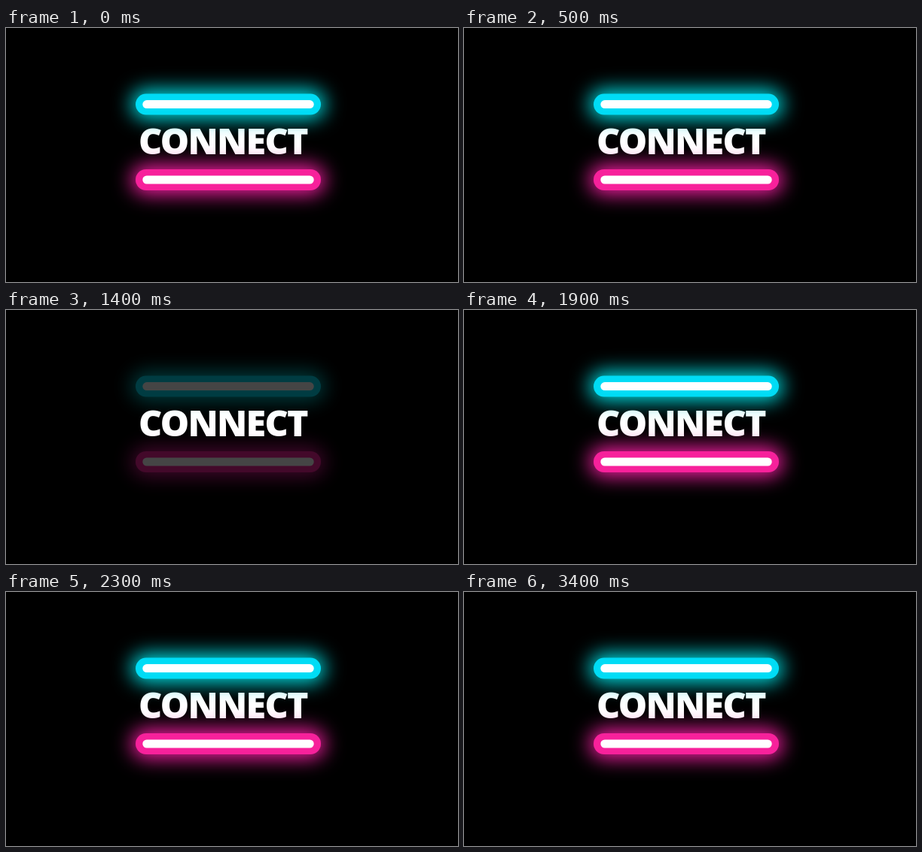
Recreate the animation shown at these times as an HTML page. Size 600 by 338 pixels, loop 3.5 s.

```html
<!DOCTYPE html>
<html lang="en">
<head>
<meta charset="utf-8">
<title>Connect</title>
<style>
  html, body { margin: 0; width: 100%; height: 100%; overflow: hidden; background: #000; }
  svg { display: block; width: 600px; height: 338px; }
  text { font: 800 48.3px "Open Sans", sans-serif; letter-spacing: -1.7px; fill: #fff; }
</style>
</head>
<body>
<svg viewBox="0 0 600 338">
  <defs>
    <filter id="glow" filterUnits="userSpaceOnUse" x="100" y="20" width="400" height="280" color-interpolation-filters="sRGB">
      <feGaussianBlur stdDeviation="13"/>
    </filter>
  </defs>
  <rect width="600" height="338" fill="#000"/>
  <text x="176" y="168.3">CONNECT</text>
  <g id="tubes"></g>
</svg>
<script>
  const LOOP = 3500;
  const DIM = 0.27;
  const SPREAD = 5.5;
  // spans of low light, in ms
  const dips = [[300, 500], [800, 1500], [2100, 2300]];
  const tubes = document.getElementById('tubes');

  function bar(x, y, w, h, fill, extra = '') {
    return `<rect x="${x}" y="${y}" width="${w}" height="${h}" rx="${h / 2}" fill="${fill}" ${extra}/>`;
  }

  function halo(y, color) {
    return bar(172 - SPREAD, y - SPREAD, 246 + 2 * SPREAD, 28 + 2 * SPREAD, color, 'filter="url(#glow)"');
  }

  function tube(y, color, haze) {
    return halo(y, haze) +
      bar(172, y, 246, 28, color) +
      bar(181.3, y + 8.5, 227.4, 11, '#fff');
  }

  tubes.innerHTML = tube(87.6, '#00dcf5', '#00dce0') + tube(188, '#f7219b', '#f01ea0');

  function draw(t) {
    const low = dips.some(([from, to]) => t >= from && t < to);
    tubes.setAttribute('opacity', low ? DIM : 1);
  }

  const start = performance.now();
  function tick() {
    draw((performance.now() - start) % LOOP);
    requestAnimationFrame(tick);
  }
  draw(0);
  requestAnimationFrame(tick);
</script>
</body>
</html>
```
